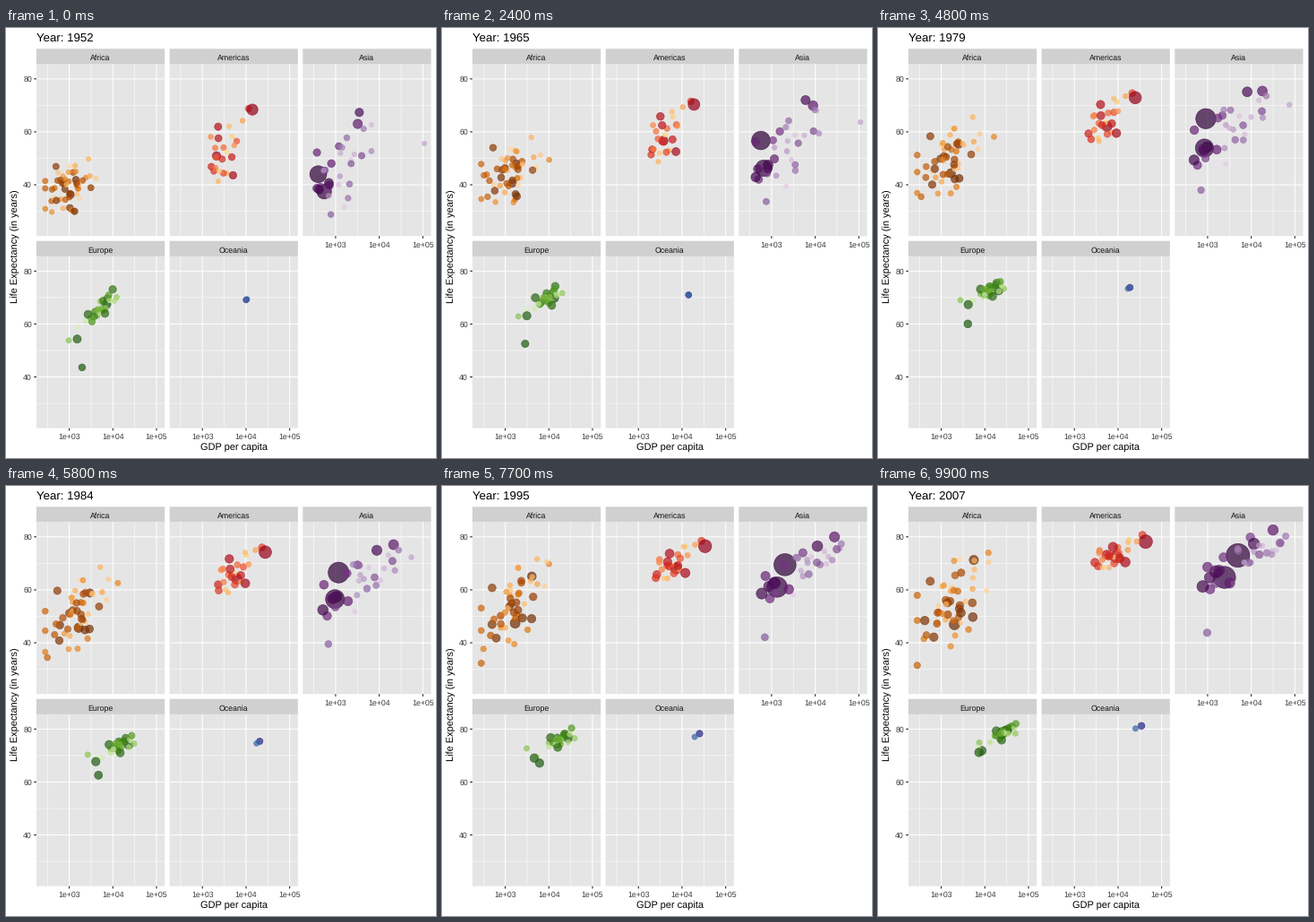
A matplotlib script for the animation above (10 s loop, 480 by 480 pixels).

```python
import numpy as np
import matplotlib.pyplot as plt
from matplotlib.animation import FuncAnimation
from matplotlib.colors import to_rgb
from matplotlib.patches import Rectangle

plt.rcParams.update({"font.family": "Liberation Sans", "path.snap": False,
                     "text.hinting": "no_hinting"})

SIZE, FRAMES = 480, 100
LEFT, TOP, W, H, STRIP, GAP = 34.0, 23.2, 143.17, 191.8, 17.2, 5.5
X0, X1 = 2.2487, 5.1887      # log10 of GDP
Y0, Y1 = 20.649, 85.553      # years of life
KEYS = (1952, 1972, 1992, 2007)
TIMES = np.linspace(1952, 2007, FRAMES)
SURVEYS = np.arange(1952, 2008, 5)

rng = np.random.default_rng(7)
fig = plt.figure(figsize=(SIZE / 72, SIZE / 72), dpi=72, facecolor="white")
ax = fig.add_axes([0, 0, 1, 1])
ax.set(xlim=(0, SIZE), ylim=(SIZE, 0))
ax.axis("off")


def label(x, y, s, size, color="black", ha="center", **kw):
    return ax.text(x, y, s, fontsize=size, color=color, ha=ha, va="baseline", **kw)


def line(x, y, color, width):
    ax.plot(x, y, color=color, lw=width, solid_capstyle="butt", zorder=2)


def over_time(values):
    return np.interp(TIMES, KEYS, values)


def shade(stops, count):
    """Colour ramp through the stops, slightly darkened by display gamma."""
    rgb = np.array([to_rgb("#" + s) for s in stops.split()])
    t = np.linspace(0, len(rgb) - 1, count)
    ramp = [np.interp(t, range(len(rgb)), rgb[:, i]) for i in range(3)]
    return np.transpose(ramp) ** 1.22


def drift(n, lean=0):
    """Standard scores that slowly turn from one random set into another."""
    q = np.linspace(-1, 1, n)
    a, b = rng.normal(size=(2, n)) + lean * q
    turn = 0.7 * (TIMES - 1952) / 55
    z = np.outer(a, np.cos(turn)) + np.outer(b, np.sin(turn))
    return np.clip((z - z.mean(0)) / z.std(0), -2.1, 2.1)


def wiggle(n, amount):
    """Small random change from one five-year survey to the next."""
    noise = amount * rng.normal(size=(n, len(SURVEYS)))
    return np.array([np.interp(TIMES, SURVEYS, row) for row in noise])


class Panel:
    def __init__(self, name, col, row, stops, x_axis=False):
        self.x = LEFT + col * (W + GAP)
        self.y = TOP + STRIP + row * (H + STRIP + GAP)
        self.stops = stops
        self.gdp, self.life, self.pops = [], [], []
        self.draw_frame(name, col == 0, x_axis)

    def draw_frame(self, name, y_axis, x_axis):
        x, y = self.x, self.y
        ax.add_patch(Rectangle((x, y - STRIP), W, STRIP, fc="#d0d0d0", lw=0))
        ax.add_patch(Rectangle((x, y), W, H, fc="#e5e5e5", lw=0))
        label(x + W / 2, y - 4, name, 8.8, "#121212")
        for k in (2.5, 3.5, 4.5):
            line([self.px(k)] * 2, [y, y + H], "white", 0.53)
        for k in (30, 50, 70):
            line([x, x + W], [self.py(k)] * 2, "white", 0.53)
        for k in (3, 4, 5):
            gx = self.px(k)
            line([gx, gx], [y, y + H], "white", 1.07)
            if x_axis:
                line([gx, gx], [y + H, y + H + 2.75], "#262626", 1.07)
                label(gx, y + H + 12.6, f"1e+0{k}", 8.8, "#3d3d3d")
        for k in (40, 60, 80):
            gy = self.py(k)
            line([x, x + W], [gy, gy], "white", 1.07)
            if y_axis:
                line([x - 2.75, x], [gy, gy], "#262626", 1.07)
                label(x - 5, gy + 3.2, str(k), 8.8, "#3d3d3d", "right")

    def px(self, log_gdp):
        return self.x + (log_gdp - X0) / (X1 - X0) * W

    def py(self, life):
        return self.y + (Y1 - life) / (Y1 - Y0) * H

    def lead(self, pops, life, gdp):
        """A standout country: population in millions at both ends, and its path."""
        self.pops.append(pops)
        self.life.append(over_time(life))
        self.gdp.append(over_time(np.log10(gdp)))

    def cloud(self, n, top, growth, lean, gdp, gdp_sd, life, life_sd, corr):
        """The other countries, scattered around the moving panel average."""
        pop = top * np.linspace(1, 0, n) ** 3 + 0.3
        u, v = drift(n, lean), drift(n)
        r = over_time(corr)
        x = over_time(gdp) + over_time(gdp_sd) * u + wiggle(n, 0.025)
        y = over_time(life) + over_time(life_sd) * (r * u + np.sqrt(1 - r * r) * v)
        y = np.clip(y + wiggle(n, 0.4), 28, 82)
        for i in rng.permutation(n):
            self.pops.append((pop[i] / growth, pop[i]))
            self.gdp.append(np.maximum(x[i], 2.45))
            self.life.append(y[i])

    def dots(self):
        start, end = np.sqrt(self.pops).T[:, :, None]
        root = start + (end - start) * (TIMES - 1952) / 55
        diameter = ((2 + 10 * root / np.sqrt(1319)) * 2.845 + 0.945) * 0.75
        rank = np.argsort(np.argsort(-end[:, 0], kind="stable"))
        return (self.px(np.array(self.gdp)), self.py(np.array(self.life)),
                diameter ** 2, shade(self.stops, len(rank))[rank])


africa = Panel("Africa", 0, 0, "7f3b08 b35806 e08214 fdb863 fee0b6")
africa.lead((33, 135), (36.3, 42.8, 47.5, 46.9), (1077, 1698, 1620, 2014))
africa.lead((22, 80), (41.9, 51.1, 63.7, 71.3), (1419, 2024, 3795, 5581))
africa.lead((1, 6), (42.7, 52.8, 68.8, 74), (2388, 21011, 9641, 12057))
africa.cloud(49, 70, 3.8, 0.3, gdp=(2.98, 3.15, 3.15, 3.22),
             gdp_sd=(0.30, 0.35, 0.38, 0.43), life=(39, 47.3, 53.3, 54.5),
             life_sd=(5.1, 6.4, 8.8, 9), corr=(0.3, 0.4, 0.65, 0.5))

americas = Panel("Americas", 1, 0, "a50026 d73027 f46d43 fdae61 fee090")
americas.lead((57, 190), (50.9, 59.5, 67.1, 72.4), (2109, 4986, 6950, 9066))
americas.lead((15, 33), (68.8, 72.9, 78, 80.7), (11367, 18971, 26343, 36319))
americas.lead((158, 301), (68.4, 71.3, 76.1, 78.2), (13990, 21806, 32004, 42952))
americas.cloud(22, 100, 3, 0, gdp=(3.48, 3.67, 3.76, 3.90),
               gdp_sd=(0.20, 0.22, 0.25, 0.26), life=(52, 61.7, 69.1, 73.2),
               life_sd=(8.6, 7, 5, 4), corr=(0.6, 0.7, 0.75, 0.75))

asia = Panel("Asia", 2, 0, "40004b 762a83 9970ab c2a5cf e7d4e8", True)
asia.lead((8, 32), (28.8, 36.1, 41.7, 43.8), (779, 740, 649, 975))
asia.lead((556, 1319), (44, 63.1, 68.7, 73), (400, 677, 1656, 4959))
asia.lead((372, 1110), (37.4, 50.7, 60.2, 64.7), (547, 724, 1164, 2452))
asia.lead((86, 127), (63, 73.4, 79.4, 82.6), (3217, 14779, 26825, 31656))
asia.lead((0.2, 2.5), (55.6, 67.7, 75.2, 77.6), (108382, 109348, 34933, 47307))
asia.cloud(28, 210, 3, 0.8, gdp=(3.12, 3.42, 3.64, 3.84),
           gdp_sd=(0.36, 0.46, 0.52, 0.54), life=(46.8, 57.2, 67, 71.3),
           life_sd=(8.4, 8.6, 6.2, 6), corr=(0.5, 0.65, 0.8, 0.8))

europe = Panel("Europe", 0, 1, "276419 4d9221 7fbc41 b8e186 e6f5d0", True)
europe.lead((2.8, 4.6), (53.8, 67.4, 72.2, 74.9), (974, 2860, 2547, 7446))
europe.lead((69, 82), (67.5, 71, 76.1, 79.4), (7144, 18016, 26505, 32170))
europe.lead((22, 71), (43.6, 57, 66.1, 71.8), (1969, 3451, 5678, 8458))
europe.cloud(27, 62, 1.25, 0, gdp=(3.69, 4.05, 4.16, 4.37),
             gdp_sd=(0.23, 0.20, 0.25, 0.24), life=(65.4, 71.2, 74.7, 77.8),
             life_sd=(4.4, 1.8, 2.8, 2.7), corr=(0.9, 0.8, 0.85, 0.9))

oceania = Panel("Oceania", 1, 1, "313695 4575b4", True)
oceania.lead((8.7, 20.4), (69.1, 71.9, 77.6, 81.2), (10040, 16789, 23425, 34435))
oceania.lead((2, 4.1), (69.4, 71.9, 76.3, 80.2), (10557, 16046, 18363, 25185))

label(254.25, 472, "GDP per capita", 11)
label(13.4, 243.6, "Life Expectancy (in years)", 11, rotation=90,
      rotation_mode="anchor")
title = label(LEFT, 15.2, "", 13.2, ha="left")

panels = (africa, americas, asia, europe, oceania)
xs, ys, areas, colors = map(np.concatenate, zip(*(p.dots() for p in panels)))
dots = ax.scatter(xs[:, 0], ys[:, 0], s=areas[:, 0], c=colors, alpha=0.7,
                  linewidths=0.7, zorder=3)


def update(i):
    dots.set_offsets(np.column_stack((xs[:, i], ys[:, i])))
    dots.set_sizes(areas[:, i])
    title.set_text(f"Year: {TIMES[i]:.0f}")
    return dots, title


anim = FuncAnimation(fig, update, frames=FRAMES, interval=100,
                     init_func=lambda: update(0), repeat=True, repeat_delay=0)
plt.show()
```
